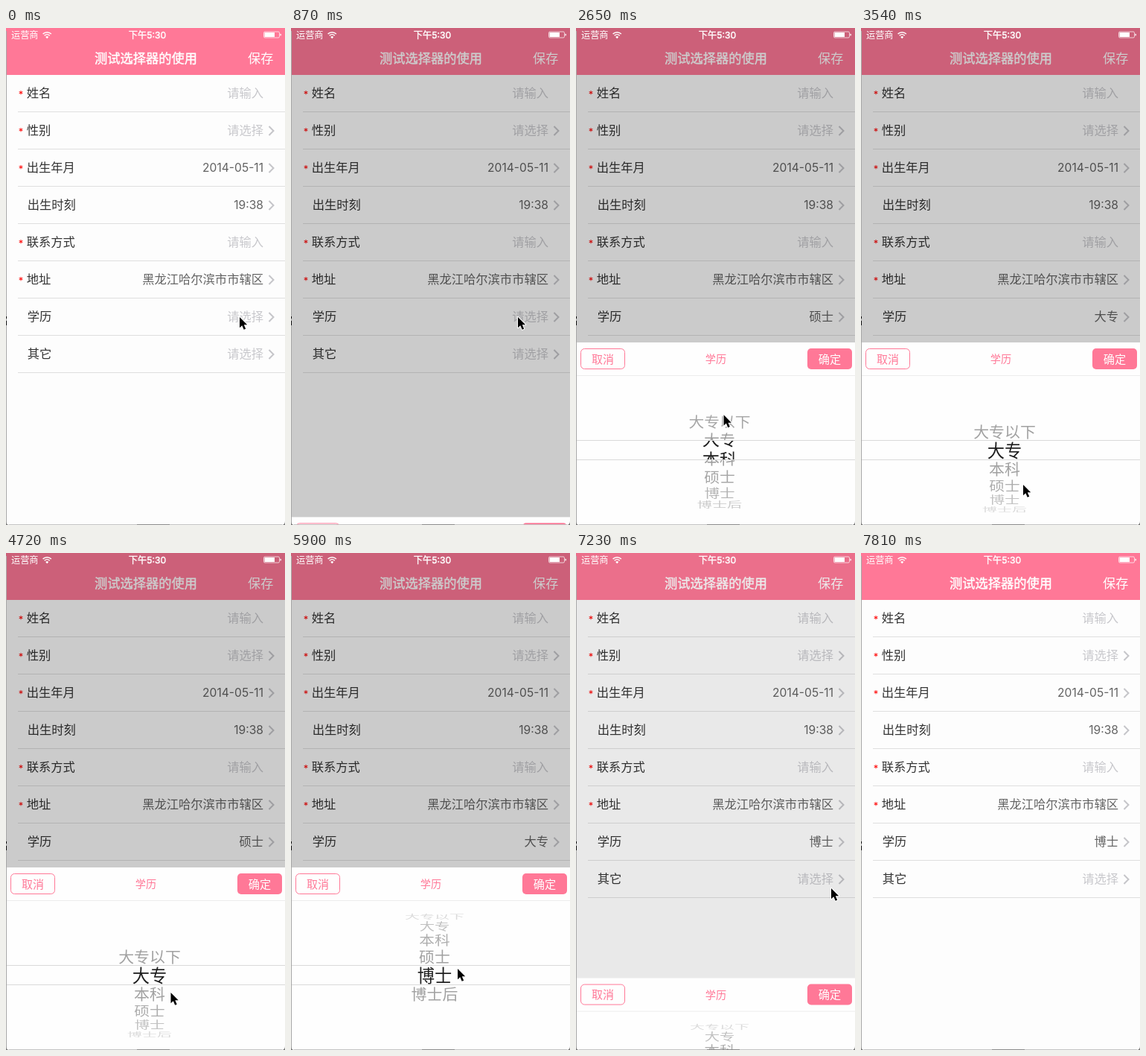
Animation, 375 px wide and 667 px high, one loop 8110 ms. Source, as an HTML page:

```html
<!DOCTYPE html>
<html lang="zh-CN">
<head>
<meta charset="utf-8">
<title>选择器</title>
<style>
  html, body { margin: 0; width: 100%; height: 100%; overflow: hidden; background: #fdfdfd; }
  svg { display: block; width: 375px; height: 667px; }
  text { font-family: Inter, "Noto Sans CJK SC", "Noto Sans CJK", "Noto Sans CJK JP", sans-serif; white-space: pre; }
  .medium { stroke: #fff; stroke-width: 0.4px; }
</style>
</head>
<body>
<svg viewBox="0 0 375 667" xmlns="http://www.w3.org/2000/svg">
  <defs>
    <clipPath id="band"><rect y="554" width="375" height="25"/></clipPath>
    <clipPath id="around"><path d="M0 467H375V553H0ZM0 580H375V667H0Z"/></clipPath>
  </defs>
  <rect width="375" height="667" fill="#fdfdfd"/>
  <rect width="375" height="63" fill="#ff7897"/>
  <g id="form"></g>
  <rect id="dim" width="375" height="667"/>
  <g id="status" fill="#fff"></g>
  <g id="sheet">
    <rect y="422" width="375" height="245" fill="#fefefe"/>
    <path d="M0 466.5H375" stroke="#ececec"/>
    <rect x="6.5" y="430.5" width="59" height="27" rx="5" fill="none" stroke="#ff7897"/>
    <rect x="311" y="430" width="60" height="28" rx="5" fill="#ff7897"/>
    <path d="M0 553.5H375M0 579.5H375" stroke="#dadada"/>
    <g id="wheel" clip-path="url(#around)"></g>
    <g id="lens" clip-path="url(#band)"></g>
  </g>
  <path d="M.5 4V667" stroke="#a9a9a9"/>
  <path d="M0 662Q0 667 5 667H0ZM375 662Q375 667 370 667H375Z" fill="#777"/>
  <path d="M4 666.5H371" stroke="#c4c4c4"/>
  <path d="M176 666.5H220" stroke="#8c8c8c"/>
  <path d="M0 387h1v3h-1zM0 393h1v6h-1z" fill="#111"/>
  <path id="cursor" d="M0 0V14.2L3.3 11.2L5.7 16.8L8.2 15.7L5.8 10.3H10.2Z"
        fill="#000" stroke="#fff" stroke-width="2" paint-order="stroke" stroke-linejoin="round"/>
</svg>
<script>
const LOOP = 8110, TICK = 147.4;
const PINK = '#ff7897', HINT = '#c8c8cc', VALUE = '#636363', LABEL = '#333';
const LEVELS = ['大专以下', '大专', '本科', '硕士', '博士', '博士后'];
const WHEEL = { x: 193, y: 567, radius: 85.5, angle: 17 * Math.PI / 180 };

// Times are in ticks. A gesture ends at a point; a drag also turns the wheel to a level.
const GLIDE = 4, CONFIRM_DELAY = 3, SLIDE = 1.75;
const OPEN = 5.78, CLOSE = 48, LEAVE = 53;
const gestures = [
  { end: 0, x: 314, y: 388 },
  { end: 2, x: 278, y: 492 },
  { end: 4, x: 305, y: 388 },
  { end: 10, x: 195, y: 598 },
  { end: 14, x: 195, y: 502, level: 3 },
  { end: 21, x: 218, y: 613, level: 1 },
  { end: 28, x: 220, y: 560, level: 3 },
  { end: 34, x: 223, y: 620, level: 1 },
  { end: 38, x: 224, y: 558, level: 4 },
  { end: 45, x: 341, y: 481 },
  { end: 47, x: 343, y: 450 },
  { end: LEAVE, x: 331, y: 594 }
];
const drags = gestures.filter(g => 'level' in g);

const $ = id => document.getElementById(id);
const clamp = k => Math.min(1, Math.max(0, k));
const smooth = k => k * k * (3 - 2 * k);
const overshoot = k => 1 + 2 * (k - 1) ** 3 + (k - 1) ** 2;
const mix = (a, b, k) => a + (b - a) * k;
const slide = (tick, start) => smooth(clamp((tick - start) / SLIDE));

function add(parent, tag, attrs, content = '') {
  const el = document.createElementNS('http://www.w3.org/2000/svg', tag);
  for (const name in attrs) el.setAttribute(name, attrs[name]);
  el.textContent = content;
  parent.append(el);
  return el;
}

// Places a line of text by its vertical centre.
function label(parent, content, x, cy, size, fill, anchor = 'start', style = '') {
  return add(parent, 'text', {
    x, y: cy + size * 0.38, 'font-size': size, fill, 'text-anchor': anchor, class: style
  }, content);
}

function buildForm() {
  const form = $('form');
  label(form, '测试选择器的使用', 188, 40.7, 17.25, '#fff', 'middle', 'medium');
  label(form, '保存', 359.5, 40.7, 17.2, '#fff', 'end');
  const rows = [
    ['姓名', '请输入', true], ['性别', '请选择', true], ['出生年月', '2014-05-11', true],
    ['出生时刻', '19:38', false], ['联系方式', '请输入', true],
    ['地址', '黑龙江哈尔滨市市辖区', true], ['学历', '请选择', false], ['其它', '请选择', false]
  ];
  return rows.map(([name, value, required], i) => {
    const cy = 87 + 50 * i;
    if (required) add(form, 'text', { x: 16.7, y: cy + 7, 'font-size': 13, fill: '#f00' }, '*');
    label(form, name, required ? 27.7 : 28.7, cy, 16.3, LABEL);
    const size = /\d/.test(value) ? 15.6 : 16.3;
    const field = label(form, value, 346, cy, size, value.startsWith('请') ? HINT : VALUE, 'end');
    if (value !== '请输入') {
      add(form, 'path', { d: `M353.5 ${cy - 5}l6 6l-6 6`, fill: 'none', stroke: '#c5c5c9', 'stroke-width': 2 });
    }
    add(form, 'path', { d: `M16 ${cy + 25.5}H375`, stroke: '#dfdfdf' });
    return field;
  });
}

function buildStatus() {
  const bar = $('status');
  label(bar, '运营商', 7, 9.3, 12.2, '#fff');
  label(bar, '下午5:30', 190, 9.3, 12.2, '#fff', 'middle', 'medium');
  add(bar, 'path', {
    d: 'M49.6 8a8 8 0 0 1 11.2 0M51.7 10.2a5 5 0 0 1 7 0',
    fill: 'none', stroke: '#fff', 'stroke-width': 1.6
  });
  add(bar, 'path', { d: 'M55.2 14.2l-2-2.1a2.8 2.8 0 0 1 4 0z' });
  add(bar, 'rect', { x: 346.5, y: 5, width: 21, height: 8, rx: 1.5, fill: 'none', stroke: '#fff', 'stroke-width': 0.7 });
  add(bar, 'rect', { x: 347.5, y: 6, width: 13.5, height: 6 });
  add(bar, 'path', { d: 'M368.5 7.5v3q1.5 0 1.5-1.5t-1.5-1.5' });
}

function buildSheet() {
  const sheet = $('sheet');
  label(sheet, '取消', 36, 444, 15, PINK, 'middle');
  label(sheet, '学历', 188, 444, 14.2, PINK, 'middle');
  label(sheet, '确定', 341, 444, 15.2, '#fff', 'middle');
}

const buildItems = group => LEVELS.map(name => label(group, name, 0, 0, 21, '#000', 'middle'));

const degree = buildForm()[6];
buildStatus();
buildSheet();
const wheel = buildItems($('wheel')), lens = buildItems($('lens'));

function pointerAt(tick) {
  return gestures.reduce((from, to, i) => {
    const start = i ? Math.max(gestures[i - 1].end, to.end - GLIDE) : -1;
    const k = smooth(clamp((tick - start) / (to.end - start)));
    return { x: mix(from.x, to.x, k), y: mix(from.y, to.y, k) };
  }, gestures[0]);
}

const levelAt = tick => drags.reduce(
  (level, drag) => mix(level, drag.level, overshoot(clamp((tick - drag.end + GLIDE) / GLIDE))), 0);

function turnWheel(level) {
  LEVELS.forEach((_, i) => {
    const turn = (i - level) * WHEEL.angle;
    const depth = Math.max(0, Math.cos(turn));
    const dy = WHEEL.radius * Math.sin(turn), wide = 1 - 0.08 * (1 - depth);
    const place = (el, zoom, opacity) => {
      el.setAttribute('transform',
        `translate(${WHEEL.x} ${WHEEL.y + dy * zoom}) scale(${wide * zoom} ${depth * zoom})`);
      el.setAttribute('opacity', opacity);
    };
    place(wheel[i], 1, 0.38 * depth);
    place(lens[i], 1.11, 0.88);
  });
}

function render(time) {
  const tick = Math.floor((time % LOOP + 15) / TICK);
  const { x, y } = pointerAt(tick);
  $('cursor').setAttribute('transform', `translate(${x} ${y})`);
  $('cursor').style.display = tick < LEAVE ? '' : 'none';

  const closing = slide(tick, CLOSE), shown = slide(tick, OPEN) - closing;
  $('dim').setAttribute('opacity', tick > OPEN ? 0.2 * (1 - closing) : 0);
  $('sheet').setAttribute('transform', `translate(0 ${245 * (1 - shown)})`);
  turnWheel(levelAt(tick));

  const chosen = drags.filter(drag => drag.end + CONFIRM_DELAY <= tick).pop();
  degree.textContent = chosen ? LEVELS[chosen.level] : '请选择';
  degree.setAttribute('fill', chosen ? VALUE : HINT);
}

const start = performance.now();
function loop() {
  render(performance.now() - start);
  requestAnimationFrame(loop);
}
loop();
</script>
</body>
</html>
```
